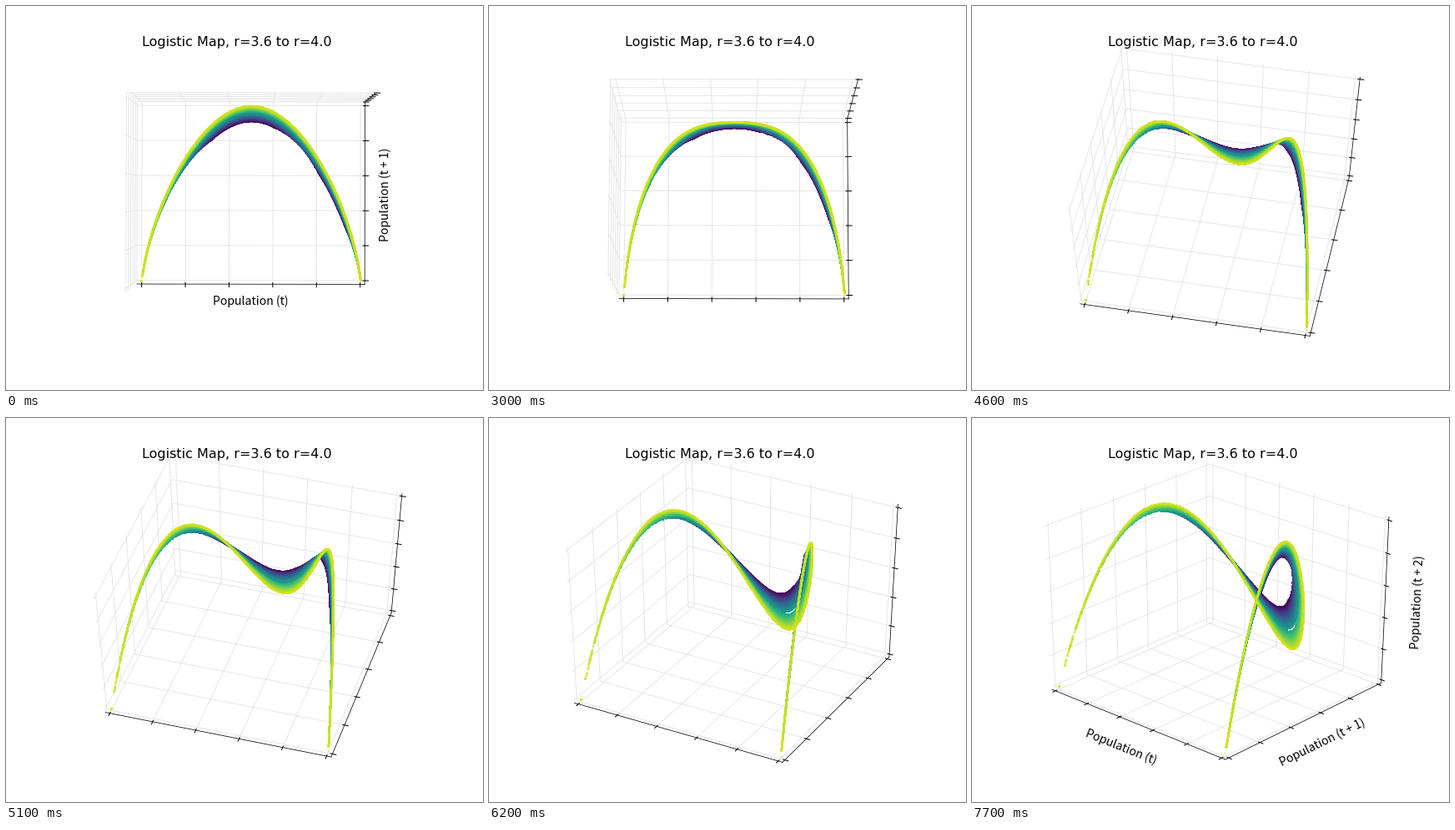
Animation of 572 by 460 pixels, one loop 10 s. Source, as a matplotlib script:

```python
import numpy as np
import matplotlib.pyplot as plt
from matplotlib.animation import FuncAnimation

W, H, DPI = 572, 460, 64
PT = 72 / DPI  # points per pixel

# camera: steps in degrees per frame for each stretch of the move
COUNTS = [20, 3, 14, 24, 4, 9, 3, 23]
ELEV = 89.9 - np.cumsum(np.repeat([0, 0.5, 1, 1.5, 1, 0.5, 0.2, 0], COUNTS))
AZIM = 270.1 + np.cumsum(np.repeat([0, 0, 0, 1.1, 1.1, 1.1, 0.5, 0], COUNTS))
DIST = 11
CENTER = (293.9, 223.9)
SCALE = (274.4, 219.4)

# box geometry
LO, HI = -1 / 48, 1 + 1 / 48
TICKS = np.linspace(0, 1, 6)
BACK = (LO, HI, LO)
EDGES = [(0, LO, LO), (HI, 0, LO), (HI, HI, 0)]
TICK_DIRS = [(1, -1), (0, 1), (0, 1)]

LABELS = ["Population (t)", "Population (t + 1)", "Population (t + 2)"]
START_POS = {0: (293.5, 353.5), 1: (454.5, 226)}
END_POS = {0: (178.5, 394), 1: (420, 389), 2: (534, 220.5)}
HIDE, SHOW = 20, 77

RATES = np.linspace(3.6, 4.0, 50)
GENS = 1000


def logistic_orbits():
    pops = np.empty((GENS, len(RATES)))
    pops[0] = 0.5
    for t in range(GENS - 1):
        pops[t + 1] = RATES * pops[t] * (1 - pops[t])
    return np.stack([pops[:-2], pops[1:-1], pops[2:]], axis=-1).swapaxes(0, 1)


def project(points, n):
    """Perspective view of unit-cube points: pixel x, pixel y, nearness."""
    e, a = np.radians(ELEV[n]), np.radians(AZIM[n])
    right = np.array([-np.sin(a), np.cos(a), 0])
    up = np.array([-np.sin(e) * np.cos(a), -np.sin(e) * np.sin(a), np.cos(e)])
    eye = np.array([np.cos(e) * np.cos(a), np.cos(e) * np.sin(a), np.sin(e)])
    p = np.asarray(points) - 0.5
    near = p @ eye
    k = 1 / (1 - near / DIST)
    x = CENTER[0] + SCALE[0] * (p @ right) * k
    y = CENTER[1] - SCALE[1] * (p @ up) * k
    return x, y, near


def moved(point, axis, value):
    q = list(point)
    q[axis] = value
    return q


def grid_path(axis, t):
    corner = moved(BACK, axis, t)
    j, k = [i for i in range(3) if i != axis]
    return [moved(corner, j, LO + HI - corner[j]), corner,
            moved(corner, k, LO + HI - corner[k])]


def tick_path(axis, t):
    p = moved(EDGES[axis], axis, t)
    d, sign = TICK_DIRS[axis]
    return [moved(p, d, p[d] - sign * 0.1 / 12),
            moved(p, d, p[d] + sign * 0.2 / 12)]


def axis_path(axis):
    return [moved(EDGES[axis], axis, LO), moved(EDGES[axis], axis, HI)]


fig = plt.figure(figsize=(W / DPI, H / DPI), dpi=DPI, facecolor="white")
ax = fig.add_axes([0, 0, 1, 1])
ax.set_xlim(0, W)
ax.set_ylim(H, 0)
ax.axis("off")

frame_lines = []


def add_line(path, color, width, z):
    line, = ax.plot([], [], color=color, lw=width * PT, zorder=z)
    frame_lines.append((line, path))


for i in range(3):
    add_line(axis_path(i), "black", 0.75, 2)
    for t in TICKS:
        add_line(grid_path(i, t), "0.9", 1, 1)
        add_line(tick_path(i, t), "black", 1, 3)

orbits = logistic_orbits()
colors = plt.get_cmap("viridis")(np.linspace(0, 0.95, len(RATES)))
dots = [ax.plot([], [], "o", ms=2.2 * PT, mew=0, color=c, alpha=0.7)[0]
        for c in colors]

ax.text(277, 48, "Logistic Map, r=3.6 to r=4.0", family="DejaVu Sans",
        size=16 * PT, ha="center", va="baseline", zorder=100)
labels = [ax.text(0, 0, s, family="Noto Sans CJK JP", size=14.1 * PT,
                  ha="center", va="center", zorder=100, visible=False)
          for s in LABELS]


def update(n):
    for line, path in frame_lines:
        x, y, _ = project(path, n)
        line.set_data(x, y)

    xs, ys, near = project(orbits, n)
    rank = np.argsort(np.argsort(near.max(axis=1), kind="stable"))
    for dot, x, y, r in zip(dots, xs, ys, rank):
        dot.set_data(x, y)
        dot.set_zorder(10 + r)

    places = START_POS if n < HIDE else END_POS if n >= SHOW else {}
    for i, label in enumerate(labels):
        label.set_visible(i in places)
        if i in places:
            x, y, _ = project(axis_path(i), n)
            label.set_position(places[i])
            label.set_rotation(np.degrees(np.arctan2(y[0] - y[1], x[1] - x[0])))
    return []


anim = FuncAnimation(fig, update, frames=100, interval=100,
                     init_func=lambda: update(0), repeat=True, repeat_delay=0)
plt.show()
```
